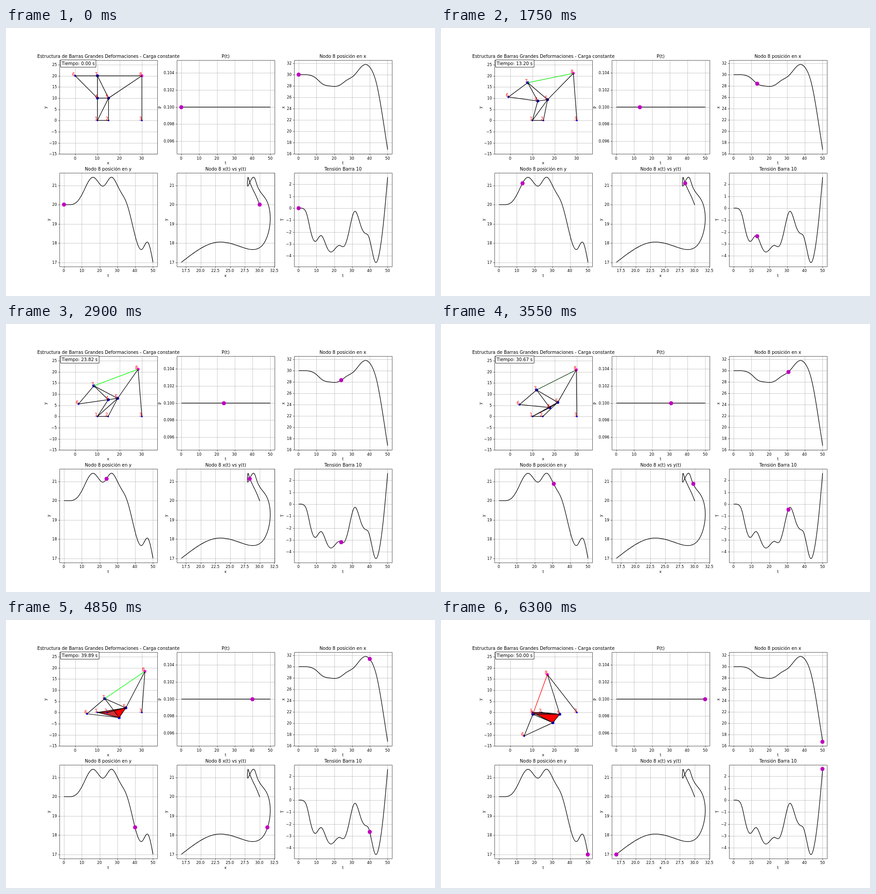
Write an HTML page with a canvas that moves like this. It is 947x592 px and loops after 6350 ms.

```html
<!DOCTYPE html>
<html lang="es">
<head>
<meta charset="utf-8">
<style>
html, body { margin: 0; width: 100%; height: 100%; overflow: hidden; background: #fff; }
canvas { display: block; }
</style>
</head>
<body>
<canvas id="stage" width="947" height="592"></canvas>
<script>
const ctx = document.getElementById('stage').getContext('2d');
const FONT = '"DejaVu Sans", sans-serif';
const SMALL = 8.22, LARGE = 9.85, W = 215.9, H = 207.2;
const LEFT = [118.4, 377.4, 636.4], TOP = [71.04, 319.7];

// Cubic spline through the key points: starts at rest, ends without curvature
function spline(xs, ys) {
  const n = xs.length - 1;
  const h = i => xs[i + 1] - xs[i], slope = i => (ys[i + 1] - ys[i]) / h(i);
  const c = [.5], d = [3 * slope(0) / h(0)], bend = [];
  for (let i = 1; i < n; i++) {
    const k = 2 * (h(i - 1) + h(i)) - h(i - 1) * c[i - 1];
    c[i] = h(i) / k;
    d[i] = (6 * (slope(i) - slope(i - 1)) - h(i - 1) * d[i - 1]) / k;
  }
  bend[n] = 0;
  for (let i = n - 1; i >= 0; i--) bend[i] = d[i] - c[i] * bend[i + 1];
  return x => {
    let i = 0;
    while (i < n - 1 && x > xs[i + 1]) i++;
    const u = (x - xs[i]) / h(i), v = 1 - u;
    return v * ys[i] + u * ys[i + 1]
      + h(i) ** 2 / 6 * ((v ** 3 - v) * bend[i] + (u ** 3 - u) * bend[i + 1]);
  };
}
const curve = (...points) => spline(points.map(p => p[0]), points.map(p => p[1]));

// Simulated seconds for each animation step
const simTime = curve([0, 0], [17, 3.41], [35, 13.2], [58, 23.82], [65, 27.9], [84, 35.06],
  [111, 45.24], [126, 50]);

// Node 8 and the tension of bar 10 against simulated seconds
const posX = curve([0, 30], [5, 29.98], [9.6, 29.41], [13.2, 28.4], [17.5, 28], [20.8, 27.94],
  [23.82, 28.3], [26.7, 28.98], [31, 29.85], [35.06, 31.35], [37.6, 31.82], [40.5, 31.1],
  [43.9, 28.23], [47.2, 22.48], [50, 16.73]);
const posY = curve([0, 20], [4.5, 20.01], [7.5, 20.17], [11, 20.7], [13.2, 21.12], [16.6, 21.42],
  [22.2, 20.97], [26.7, 21.43], [30, 21], [32.3, 20.6], [35.06, 20.11], [38, 19.13],
  [41, 18.04], [43.9, 17.68], [47.2, 18.03], [50, 17]);
const tension = curve([0, 0], [2.6, -.05], [4.5, -.5], [6.6, -1.87], [9.1, -2.79], [12.7, -2.31],
  [15.7, -3.24], [17.9, -3.68], [22.9, -3.13], [25.6, -3.18], [28.1, -2.06], [31.4, -.28],
  [35.06, -1.54], [37.5, -2.13], [39.2, -2.34], [41, -3.39], [43.1, -4.54], [45.24, -3.85],
  [48.2, -.42], [50, 2.61]);

// Joint coordinates at shared key times
const keyed = (...values) => spline([0, 13.2, 23.82, 35.06, 45.24, 50], values);
const joints = {
  1: [() => 10, () => 0],
  2: [t => 15 - t * t / 2800, () => 0],
  3: [() => 30, () => 0],
  4: [keyed(10, 12.4, 14.9, 19.3, 19.5, 19.2), keyed(10, 8.7, 7.5, .9, -4.5, -4.6)],
  5: [keyed(15, 16.8, 19.1, 22.5, 22.5, 22.3), keyed(10, 9.3, 8.1, 4.5, -.1, -.8)],
  6: [keyed(0, -.8, 1.5, 5.3, 5.3, 6.3), keyed(20, 10.5, 5.6, 3.8, -6.5, -10.5)],
  7: [keyed(10, 7.9, 8.4, 13.5, 11.7, 10.2), keyed(20, 16.9, 13.7, 9.8, 2, -.8)],
  8: [posX, posY]
};
const BARS = ['12', '14', '15', '25', '45', '46', '47', '57', '67', '58', '38', '78'];
const radius = k => k < 4 ? 1.9 : k === '6' ? 2.3 : 3.2;

function range(from, to, step) {
  const out = [];
  for (let v = from; v <= to + step / 2; v += step) out.push(v);
  return out;
}

// Axes: pixel of zero, pixels per unit, ticks and decimals
const axis = (zero, scale, ticks, decimals = 0) =>
  ({ zero, scale, ticks, decimals, px: v => zero + scale * v });
const timeAxis = col => axis(LEFT[col] + 9.8, 3.925, range(0, 50, 10));
const heightAxis = axis(1239.2, -42.45, range(17, 21, 1));

const panels = [
  { title: 'Estructura de Barras Grandes Deformaciones - Carga constante', xl: 'x', yl: 'y',
    x: axis(152.75, 4.907, range(0, 30, 10)), y: axis(204.2, -4.933, range(-15, 25, 5)) },
  { title: 'P(t)', xl: 't', yl: 'P', x: timeAxis(1),
    y: axis(2058.2, -18836, range(.096, .104, .002), 3), at: t => [t, .1] },
  { title: 'Nodo 8 posición en x', xl: 't', yl: 'x', x: timeAxis(2),
    y: axis(477.6, -12.48, range(16, 32, 2)), at: t => [t, posX(t)] },
  { title: 'Nodo 8 posición en y', xl: 't', yl: 'y', x: timeAxis(0),
    y: heightAxis, at: t => [t, posY(t)] },
  { title: 'Nodo 8 x(t) vs y(t)', xl: 'x', yl: 'y',
    x: axis(169.7, 13, range(17.5, 32.5, 2.5), 1), y: heightAxis, at: t => [posX(t), posY(t)] },
  { title: 'Tensión Barra 10', xl: 't', yl: 'T', x: timeAxis(2),
    y: axis(397.9, -26.3, range(-4, 2, 1)), at: t => [t, tension(t)] }
];
const place = (p, [x, y]) => [p.x.px(x), p.y.px(y)];

const snap = v => Math.round(v) + .5;
const label = (v, d) => v.toFixed(d).replace('-', '\u2212');

// Text starts on whole pixels; anchor 0 is left, .5 centre, 1 right
function text(s, x, y, size, anchor, color = '#000') {
  ctx.font = size + 'px ' + FONT;
  ctx.fillStyle = color;
  const w = ctx.measureText(s).width;
  const left = x - w * anchor;
  ctx.fillText(s, anchor === .5 ? Math.floor(left) : Math.round(left), Math.round(y));
  return w;
}

function stroke(points, color, width) {
  ctx.beginPath();
  points.forEach(p => ctx.lineTo(...p));
  ctx.strokeStyle = color;
  ctx.lineWidth = width;
  ctx.stroke();
}

function disc([x, y], r, color) {
  ctx.beginPath();
  ctx.arc(x, y, r, 0, 7);
  ctx.fillStyle = color;
  ctx.fill();
}

function drawAxes(p, l, top) {
  const b = top + H, r = l + W;
  let widest = 0;
  for (const v of p.x.ticks) {
    const x = p.x.px(v), q = snap(x);
    stroke([[q, top], [q, b]], '#b0b0b0', .66);
    stroke([[q, b], [q, b + 3.2]], '#000', .66);
    text(label(v, p.x.decimals), x, b + 12.4, SMALL, .5);
  }
  for (const v of p.y.ticks) {
    const y = p.y.px(v), q = snap(y);
    stroke([[l, q], [r, q]], '#b0b0b0', .66);
    stroke([[l - 2.9, q], [l, q]], '#000', .66);
    widest = Math.max(widest, text(label(v, p.y.decimals), l - 5.8, y + 3.1, SMALL, 1));
  }
  text(p.title, l + W / 2, top - 4.9, LARGE, .5);
  text(p.xl, l + W / 2, b + 23.1, SMALL, .5);
  ctx.save();
  ctx.translate(Math.round(l - 11 - widest), Math.round(top + H / 2));
  ctx.rotate(-Math.PI / 2);
  text(p.yl, 0, 0, SMALL, .5);
  ctx.restore();
}

function drawBorder(l, top) {
  const x = snap(l), y = snap(top);
  ctx.strokeStyle = '#000';
  ctx.lineWidth = .66;
  ctx.strokeRect(x, y, snap(l + W) - x, snap(top + H) - y);
}

function triangle(...corners) {
  ctx.beginPath();
  corners.forEach(p => ctx.lineTo(...p));
  ctx.closePath();
}

function drawTruss(p, t) {
  const n = {};
  for (const k in joints) n[k] = place(p, joints[k].map(f => f(t)));
  const [a, b, c] = [n[1], n[4], n[5]];
  const turn = (b[0] - a[0]) * (c[1] - a[1]) - (b[1] - a[1]) * (c[0] - a[0]);
  // The lower panel is shaded once it has folded over
  if (turn < 0) {
    ctx.save();
    triangle(a, b, c);
    ctx.fillStyle = '#d03038';
    ctx.fill();
    ctx.clip();
    triangle(b, c, n[7]);
    ctx.fillStyle = '#f00';
    ctx.fill();
    ctx.restore();
  }
  for (const k in n) disc(n[k], radius(k), k === '8' ? '#f0f' : '#00f');
  const force = tension(t);
  const shade = Math.min(255, Math.round(Math.abs(force) * 98));
  const tint = force < 0 ? `rgb(0,${shade},0)` : `rgb(${shade},0,0)`;
  for (const bar of BARS)
    stroke([n[bar[0]], n[bar[1]]], bar === '78' ? tint : '#000', 1.25);
  for (const k in n) text(k, n[k][0], n[k][1], LARGE, 1, '#f00');
}

function drawClock(t) {
  const s = `Tiempo: ${t.toFixed(2)} s`;
  ctx.font = LARGE + 'px ' + FONT;
  const box = [120.5, 70.5, Math.round(ctx.measureText(s).width + 5.4), 16];
  ctx.fillStyle = '#fff';
  ctx.fillRect(...box);
  ctx.strokeStyle = '#000';
  ctx.lineWidth = .82;
  ctx.strokeRect(...box);
  text(s, 122.7, 82, LARGE, 0);
}

const samples = range(0, 50, .1);

function draw(now) {
  const t = Math.max(0, simTime(Math.floor(now % 6350 / 50)));
  ctx.fillStyle = '#fff';
  ctx.fillRect(0, 0, 947, 592);
  ctx.lineJoin = 'round';
  panels.forEach((p, i) => {
    const l = LEFT[i % 3], top = TOP[i < 3 ? 0 : 1];
    drawAxes(p, l, top);
    if (p.at) stroke(samples.map(s => place(p, p.at(s))), '#000', 1.25);
    else drawTruss(p, t);
    drawBorder(l, top);
    if (p.at) disc(place(p, p.at(t)).map(Math.round), 4.5, '#bf00bf');
  });
  drawClock(t);
}

const start = performance.now();
function tick() {
  draw(performance.now() - start);
  requestAnimationFrame(tick);
}
tick();
</script>
</body>
</html>
```
